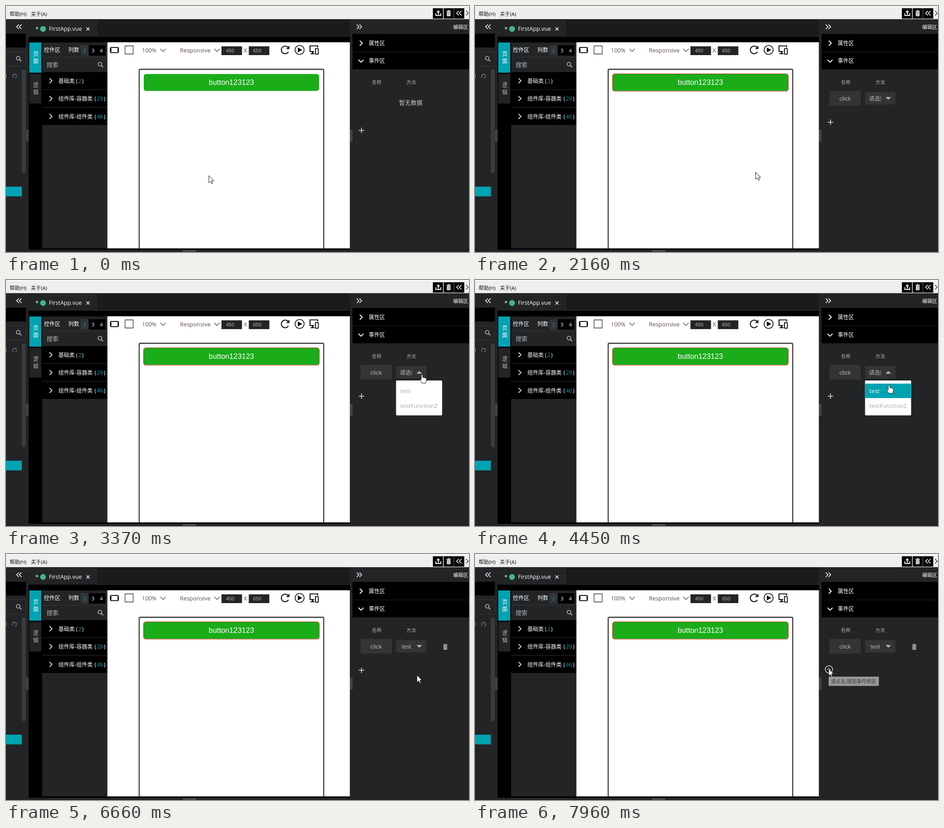
Animation of 1025x546 px, one loop 7.99 s. Source, as an HTML page with a canvas:

```html
<!DOCTYPE html>
<html lang="zh-CN">
<head>
<meta charset="utf-8">
<style>
html, body { margin: 0; width: 100%; height: 100%; overflow: hidden; background: #000; }
canvas { display: block; }
</style>
</head>
<body>
<canvas id="stage" width="1025" height="546"></canvas>
<script>
const c = document.getElementById('stage').getContext('2d');
const LOOP = 7990;
const DARK = '#222426', BOX = '#323436', TEAL = '#00a3b1', GREY = '#b4b4b4';
const UI = '"Open Sans", "Noto Sans CJK SC", "Noto Sans CJK", sans-serif';
const ARIAL = '"Liberation Sans", Arial, sans-serif';

// Pointer path: time, x, y of the tip
const PATH = [
  [340, 449, 377], [600, 460, 270], [850, 467, 190], [950, 467, 168], [1040, 462, 175],
  [1770, 462, 175], [1930, 419, 280], [2100, 540, 365], [2250, 740, 376], [2370, 875, 340],
  [2470, 926, 240], [2540, 921, 210],
  [4030, 921, 210], [4510, 916, 236],
  [5880, 916, 236], [5910, 926, 236],
  [6470, 926, 237], [6660, 910, 269], [6850, 890, 335], [6960, 870, 365],
  [7120, 845, 320], [7260, 832, 274], [7320, 825, 270], [7460, 783, 255]
];

const clamp = v => Math.max(0, Math.min(1, v));
const ramp = (t, start, length) => clamp((t - start) / length);
const easeOut = p => 1 - (1 - p) ** 5;
const easeSoft = p => 1 - (1 - p) ** 2.4;

function rect(x, y, w, h, color, r = 0) {
  c.fillStyle = color;
  c.beginPath();
  c.roundRect(x, y, w, h, r);
  c.fill();
}
function frame(x, y, w, h, color, width = 1, r = 0) {
  c.strokeStyle = color;
  c.lineWidth = width;
  c.beginPath();
  c.roundRect(x, y, w, h, r);
  c.stroke();
}
function line(points, color, width = 1.5) {
  c.strokeStyle = color;
  c.lineWidth = width;
  c.beginPath();
  for (let i = 0; i < points.length; i += 2) c.lineTo(points[i], points[i + 1]);
  c.stroke();
}
function shape(points, color) {
  c.fillStyle = color;
  c.beginPath();
  for (let i = 0; i < points.length; i += 2) c.lineTo(points[i], points[i + 1]);
  c.fill();
}
function arc(x, y, r, color, width, from = 0, to = 7) {
  c.beginPath();
  c.arc(x, y, r, from, to);
  if (width) {
    c.strokeStyle = color;
    c.lineWidth = width;
    c.stroke();
  } else {
    c.fillStyle = color;
    c.fill();
  }
}
function text(str, x, y, size, color = '#fff', align = 'left', family = UI) {
  const weight = color === '#fff' && family === UI ? 500 : 400;
  c.font = `${weight} ${size}px ${family}`;
  c.textAlign = align;
  c.fillStyle = color;
  c.fillText(str, x, y);
}
const chevronRight = (x, y, s, color, w = 2) => line([x - s / 2, y - s, x + s / 2, y, x - s / 2, y + s], color, w);
const chevronLeft = (x, y, s, color, w = 2) => line([x + s / 2, y - s, x - s / 2, y, x + s / 2, y + s], color, w);
const chevronDown = (x, y, s, color, w = 2) => line([x - s, y - s / 2, x, y + s / 2, x + s, y - s / 2], color, w);

function plus(x, y, s, color, w) {
  line([x - s, y, x + s, y], color, w);
  line([x, y - s, x, y + s], color, w);
}
function magnifier(x, y) {
  arc(x - 1, y - 1, 4, GREY, 1.7);
  line([x + 2, y + 2, x + 6, y + 6], GREY, 2);
}
function trash(x, y, color, inner) {
  rect(x - 5, y - 5, 10, 1.6, color);
  rect(x - 2, y - 6.5, 4, 2, color);
  rect(x - 4, y - 2.5, 8, 9, color, 1);
  for (const dx of [-1.5, 1.5]) line([x + dx, y - 1, x + dx, y + 5], inner, 0.8);
}
function grip(x, y, cols, rows) {
  for (let i = 0; i < cols; i++)
    for (let j = 0; j < rows; j++) rect(x + i * 3, y + j * 3, 1.5, 1.5, '#999');
}

function topBar() {
  rect(0, 0, 1025, 29.5, '#eee');
  rect(0, 0, 1025, 2, '#fbfbfb');
  text('帮助(H)', 8, 21.5, 11.2, '#111');
  text('关于(A)', 55, 21.5, 11.2, '#111');
  for (const x of [945, 969, 992]) rect(x, 5, 22.5, 23, '#000');
  line([957, 19, 957, 11], '#fff', 2);
  shape([953, 14, 957, 9.5, 961, 14], '#fff');
  line([951.5, 16, 951.5, 21, 962.5, 21, 962.5, 16], '#fff', 1.8);
  trash(980, 16, '#fff', '#000');
  for (const x of [1000, 1006]) chevronLeft(x, 16, 5, '#fff', 1.6);
  chevronRight(1021, 16, 5, '#222', 1.2);
}

function leftSide() {
  rect(0, 29.5, 50, 517, DARK);
  for (const x of [26, 32]) chevronLeft(x, 46, 5, '#fff', 1.6);
  rect(0, 61.5, 44, 30.5, '#000');
  frame(-2, 101.5, 46, 32, '#35373a');
  magnifier(28, 117);
  rect(0, 151, 1, 9, '#999');
  arc(19, 156, 4.3, '#999', 1.2, 2.4, 7.6);
  rect(35, 141, 9, 230, '#3a3b3d', 4);
  rect(0, 401, 35, 21.5, TEAL);
  grip(45, 275, 2, 9);

  rect(50, 29.5, 712, 38.5, '#1a1b1d');
  rect(50, 29.5, 151, 38.5, DARK);
  line([200.5, 30, 200.5, 67.5, 762, 67.5], '#303234', 1);
  text('*', 65, 55.5, 13);
  arc(82, 51, 6.5, '#41b883');
  text('FirstApp.vue', 95, 55, 12.6);
  line([178, 47.5, 185, 54.5], '#fff', 1.4);
  line([185, 47.5, 178, 54.5], '#fff', 1.4);

  rect(51.5, 81, 26.5, 67, TEAL);
  rect(51.5, 150.5, 26.5, 66, DARK);
  [['页', 110.5, '#fff'], ['面', 126.5, '#fff'], ['逻', 180, GREY], ['辑', 195.5, GREY]]
    .forEach(([s, y, color]) => text(s, 66, y, 12, color, 'center'));

  rect(80, 81, 145, 457, DARK);
  text('控件区', 84, 102, 12);
  text('列数', 138, 102, 12);
  rect(165, 87, 55, 23, '#000');
  rect(165, 87, 18, 23, BOX);
  ['2', '3', '4'].forEach((s, i) => text(s, 174 + i * 18.5, 103, 11.5, i ? '#fff' : TEAL, 'center'));
  rect(80, 113, 145, 1, '#37393b');
  text('搜索', 90, 135, 13, GREY);
  magnifier(209, 130);
  [['基础类', '2', 155], ['组件库-容器类', '29', 196], ['组件库-组件类', '46', 196]].forEach(([name, n, x], i) => {
    const y = 166 + i * 39.5;
    rect(80, y - 20, 145, 39, '#000');
    rect(80, y - 20.5, 145, 1, '#2b2d2f');
    chevronRight(99, y, 5.5, '#fff', 1.7);
    text(name, 116, y + 4.5, 12);
    text('(', x, y + 4.5, 12);
    text(n, x + 5, y + 4.5, 12, TEAL);
    text(')', x + 6 + n.length * 7.3, y + 4.5, 12);
  });
}

function workspace() {
  rect(224.5, 80.5, 537, 457.5, '#fff');
  frame(231, 92, 18, 11.5, '#111', 2, 2);
  rect(230, 94, 3.5, 7.5, '#111');
  rect(247, 94, 3, 7.5, '#111');
  frame(263.5, 88.5, 18, 18, '#333', 1.3);
  text('100%', 301, 102.5, 12.6, '#5d4c48');
  chevronDown(348, 98, 6, '#5d4c48', 1.4);
  text('Responsive', 385, 102.5, 12.9, '#5d4c48');
  chevronDown(467, 98, 6, '#5d4c48', 1.4);
  rect(477, 89.5, 45.5, 19.5, DARK);
  rect(537.5, 89.5, 45.5, 19.5, DARK);
  text('450', 487, 103, 11, GREY, 'left', ARIAL);
  text('650', 547, 103, 11, GREY, 'left', ARIAL);
  text('X', 526, 102.5, 13, '#5d4c48');
  arc(618, 97.5, 8.5, '#111', 2.2, 0.55, 5.6);
  shape([620, 95.5, 627.5, 95.5, 627.5, 88], '#111');
  arc(650, 97.5, 10, '#111', 1.6);
  shape([646, 92, 656, 97.5, 646, 103], '#111');
  line([682, 101, 673, 101, 673, 88.5, 690, 88.5, 690, 92], '#111', 2.2);
  rect(677, 101, 3.5, 5, '#111');
  rect(674, 105, 9, 2, '#111');
  frame(685, 94.5, 6.5, 12.5, '#111', 2, 1);

  c.save();
  c.beginPath();
  c.rect(225, 81, 537, 457);
  c.clip();
  c.shadowColor = 'rgba(0,0,0,.5)';
  c.shadowBlur = 4;
  rect(294.3, 139.8, 409.7, 420, '#222', 2);
  c.restore();
  rect(296, 141.7, 406.2, 396.3, '#fff');
  grip(392, 541.5, 10, 2);
}

function rightSide() {
  rect(761.5, 29.5, 264, 517, DARK);
  grip(762, 275, 2, 9);
  for (const x of [779, 785]) chevronRight(x, 46, 5, '#fff', 1.6);
  text('编辑区', 990, 50.5, 11);
  rect(767, 62, 258, 39.5, '#000');
  rect(767, 102.5, 258, 38, '#000');
  chevronRight(786, 82.5, 5.5, '#fff', 1.8);
  chevronDown(786, 122, 5.5, '#fff', 1.8);
  text('属性区', 803, 86.5, 12);
  text('事件区', 803, 126, 12);
  text('名称', 810, 173, 10.6, GREY);
  text('方法', 886.5, 173, 10.6, GREY);
}

function button(selected) {
  rect(305, 151, 388, 37.5, '#1aad19', 5);
  if (selected) frame(304.5, 150.5, 389, 38.5, '#c8321c', 1.2, 5);
  text('button123123', 499, 175, 16.4, '#fff', 'center', ARIAL);
}

function eventRow(t) {
  const chosen = t >= 5280;
  rect(785, 188.5, 69, 32.5, BOX);
  text('click', 819.5, 209.5, 13, GREY, 'center', ARIAL);
  rect(863.5, 191, 67, 27.5, BOX);
  if (chosen) {
    text('test', 876, 209.5, 12.8, GREY, 'left', ARIAL);
    trash(972.5, 206, GREY, DARK);
  } else {
    c.save();
    c.beginPath();
    c.rect(863, 191, 36, 27);
    c.clip();
    text('请选择', 872, 209.5, 12.2, GREY);
    c.restore();
  }
  const turn = easeSoft(ramp(t, 2900, 300)) - easeSoft(ramp(t, 5280, 300));
  c.save();
  c.translate(915, 205);
  c.rotate(turn * Math.PI);
  shape([-6, -3, 6, -3, 0, 3], GREY);
  c.restore();
}

function dropdown(t) {
  const open = easeOut(ramp(t, 2900, 300)) - easeOut(ramp(t, 5382, 300));
  if (open <= 0.002) return;
  const hover = t >= 4400;
  c.save();
  c.translate(0, 223);
  c.scale(1, open);
  rect(863.5, 0, 102, 77.5, '#fff', 2);
  if (hover) rect(863.5, 7, 102, 32, TEAL);
  text('test', 873, 27.5, 13, hover ? '#fff' : '#aaa');
  text('testFunction2', 873, 60.5, 13, '#aaa');
  // Fade the whole list as one layer into the panel colour
  c.globalAlpha = 1 - open;
  rect(863, -1, 103, 79, DARK);
  c.restore();
}

function addButton(t) {
  if (t >= 7430) {
    arc(783.5, 256, 8.2, '#fff', 1.2);
    plus(783.5, 256, 4, '#fff', 1.2);
  } else {
    plus(787, t < 1440 ? 276 : 258, 6, '#ddd', 1.6);
  }
}

function tooltip(t) {
  c.globalAlpha = 0.6 * ramp(t, 7800, 150);
  if (c.globalAlpha > 0) {
    rect(783, 272.5, 111, 20, '#e4e4e4');
    frame(783.5, 273, 110, 19, '#bbb');
    text('请点击,增加事件绑定', 788, 286.5, 10.8, '#000');
  }
  c.globalAlpha = 1;
}

function pointAt(t) {
  const i = PATH.findIndex(p => p[0] > t);
  if (i === 0) return PATH[0].slice(1);
  if (i < 0) return PATH[PATH.length - 1].slice(1);
  const [t0, x0, y0] = PATH[i - 1], [t1, x1, y1] = PATH[i];
  const p = (t - t0) / (t1 - t0);
  return [x0 + (x1 - x0) * p, y0 + (y1 - y0) * p];
}

const ARROW = new Path2D('M0 0V16L3.7 12.6L6.2 18L8.6 17L6.2 11.6H11Z');
const HAND = new Path2D('M-1.7 11V1.5Q0 -.6 1.7 1.5V6.5L8 8Q10 8.6 10 11L8 19.5H0L-5 12.5Q-4.5 9.2 -1.7 12Z');
function pointer(t) {
  const [x, y] = pointAt(t);
  const cursor = t > 2520 && t < 5895 ? HAND : ARROW;
  c.save();
  c.translate(x, y - 0.5);
  c.fillStyle = '#fff';
  c.strokeStyle = '#111';
  c.lineWidth = 1;
  c.fill(cursor);
  c.stroke(cursor);
  c.restore();
}

function draw(now) {
  const t = now % LOOP;
  const selected = t >= 1440;
  rect(0, 0, 1025, 546, '#000');
  rect(50, 541, 712, 5, DARK);
  topBar();
  leftSide();
  workspace();
  rightSide();
  button(selected);
  if (selected) eventRow(t);
  else text('暂无数据', 896, 219, 13, '#ccc', 'center');
  addButton(t);
  dropdown(t);
  tooltip(t);
  pointer(t);
}

const start = performance.now();
function tick() {
  draw(performance.now() - start);
  requestAnimationFrame(tick);
}
tick();
</script>
</body>
</html>
```
